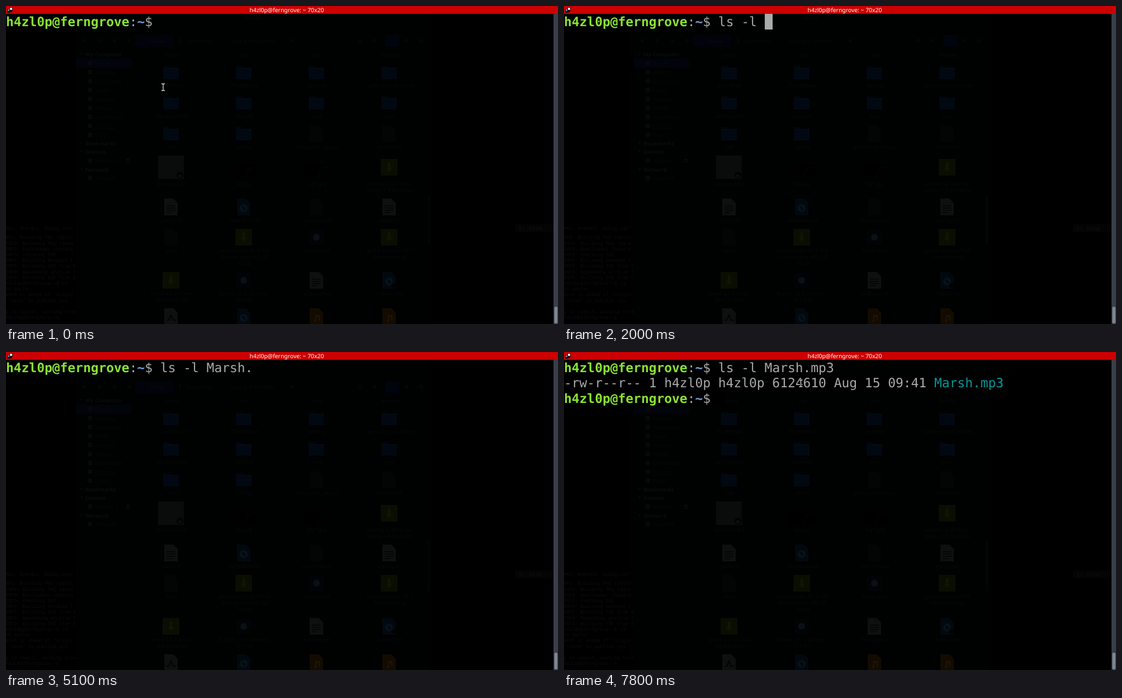
An HTML page for the animation above (8 s loop, 987x568 px).

```html
<!DOCTYPE html>
<html lang="en">
<head>
<meta charset="utf-8">
<title>Terminal</title>
<style>
  html, body { margin: 0; width: 100%; height: 100%; overflow: hidden; background: #000; }
  svg { display: block; width: 987px; height: 568px; }
  text { white-space: pre; text-rendering: geometricPrecision; }
  .term { font: 22.92px "DejaVu Sans Mono", monospace; fill: #aaa; }
  .user { font-weight: bold; fill: #8ae234; }
  .path { font-weight: bold; fill: #729fcf; }
  .file { fill: #06989a; }
  .title { font: 10.4px "Noto Sans", sans-serif; fill: #fff; text-anchor: middle; }
  .label { font: 9.4px "Noto Sans", sans-serif; fill: #101315; text-anchor: middle; }
  .side { font: 9.6px "Noto Sans", sans-serif; fill: #0d1114; }
  .head { font-weight: 600; fill: #14191a; }
  .log { font: 8.4px "DejaVu Sans Mono", monospace; fill: #1a1a1a; }
</style>
</head>
<body>
<svg id="stage" viewBox="0 0 987 568"></svg>
<script>
const stage = document.getElementById('stage');
const USER = 'h4zl0p', HOST = 'ferngrove', COMMAND = 'ls -l Marsh.mp3';
const CELL = 13.8, LINE = 27.6, BASELINE = 35.8, PROMPT_COLS = 20, LOOP = 8000;
let layer = stage;

function add(tag, attrs, content, parent = layer) {
  const node = document.createElementNS('http://www.w3.org/2000/svg', tag);
  for (const key in attrs) node.setAttribute(key, attrs[key]);
  if (content) node.textContent = content;
  parent.appendChild(node);
  return node;
}
const rect = (x, y, width, height, fill, parent, rx = 0) =>
  add('rect', { x, y, width, height, fill, rx }, '', parent);
const path = (d, fill, parent) => add('path', { d, fill }, '', parent);
const circle = (cx, cy, r, fill, parent) => add('circle', { cx, cy, r, fill }, '', parent);
const text = (x, y, cls, content, parent) => add('text', { x, y, class: cls }, content, parent);
const show = (node, on) => node.setAttribute('visibility', on ? 'visible' : 'hidden');

// Windows showing faintly through the terminal
const icons = {
  folder(x, y) {
    path(`M${x - 14} ${y - 12}h11l3 3h14v21h-28z`, '#030d18');
    rect(x - 14, y - 7, 28, 19, '#031022');
    rect(x - 14, y - 8, 28, 1, '#0a1c2b');
  },
  page(x, y, fill = '#1d1e1e') {
    path(`M${x - 12} ${y - 15}h16l8 8v22h-24z`, fill);
  },
  doc(x, y) {
    icons.page(x, y);
    for (let i = 0; i < 4; i++) rect(x - 8, y - 3 + i * 4, i === 3 ? 10 : 16, 1.5, '#060606');
  },
  blank(x, y) { icons.page(x, y, '#070808'); },
  archive(x, y) {
    rect(x - 15, y - 15, 30, 30, '#141b02', undefined, 1);
    path(`M${x - 2} ${y - 9}h4v10h4l-6 7l-6 -7h4z`, '#222a08');
  },
  web(x, y) {
    icons.page(x, y, '#03121f');
    circle(x, y + 2, 7, '#112533');
    path(`M${x - 4} ${y - 2}l6 2l2 6l-5 -1z`, '#03121f');
  },
  disc(x, y) {
    rect(x - 13, y - 13, 26, 26, '#02080f');
    circle(x, y, 6, '#172029');
  },
  picture(x, y) {
    rect(x - 24, y - 6, 48, 29, '#000');
    add('path', { d: `M${x + 3} ${y + 20}q4 -24 19 -20`, fill: 'none', stroke: '#060707', 'stroke-width': 2 });
  },
  locked(x, y) {
    rect(x - 23, y - 21, 46, 42, '#151617');
    circle(x + 16, y + 14, 6, '#040404');
    rect(x + 13, y + 13, 6, 5, '#18191a');
  },
  pulse(x, y) {
    icons.page(x, y);
    add('path', { d: `M${x - 8} ${y + 6}h4l4 -9l4 9h5`, fill: 'none', stroke: '#060606', 'stroke-width': 2 });
  },
  song(x, y) {
    icons.page(x, y, '#291700');
    path(`M${x - 2} ${y - 3}h8v10h-2v-7h-4v9h-4v-3h2z`, '#3a2a10');
  }
};

function drawFileWindow() {
  rect(125, 14, 632, 554, '#010202');
  text(441, 25, 'label', 'Home');
  rect(231, 52, 68, 21, '#010714');
  rect(678, 52, 25, 21, '#010918');
  text(270, 66, 'label', 'Home');
  text(346, 66, 'label', 'Downloads');
  text(440, 66, 'label', 'Tools and Samples');
  rect(310, 57, 3, 10, '#0b0d0f');
  for (const x of [140, 167, 194, 220, 512, 633, 659, 716, 742]) rect(x - 3, 59, 6, 6, '#080a0b');
  rect(754, 338, 4, 90, '#080a0b', undefined, 2);

  rect(125, 94, 100, 16, '#020817');
  const heads = { 90: 'My Computer', 249: 'Bookmarks', 264: 'Devices', 296: 'Network' };
  for (const y in heads) {
    text(142, y, 'side head', heads[y]);
    path(`M132 ${y - 6}h6l-3 4z`, '#0d1112');
  }
  const places = ['Home', 'Desktop', 'Document', 'Music', 'Pictures', 'Videos', 'Downloads', 'File syst', 'Trash'];
  const place = (name, y) => {
    text(159, y + 3.5, 'side', name);
    rect(146, y - 4, 8, 8, '#0d1112', undefined, 1);
  };
  places.forEach((name, i) => place(name, 102 + i * 16));
  rect(159, 219, 38, 1, '#0a1215');
  place('Volume 1', 276);
  place('Network', 307);
  path('M214 276l4 -4l4 4zM214 278h8v1.5h-8z', '#15191b');

  const rows = [
    [119, 'folder folder folder folder', 'thumbnail|Thumbtack|tooling|cyphers-mixd_name', 26],
    [173, 'folder folder folder folder', 'sandbox-old|volume|wire|yarn', 27],
    [228, 'folder folder blank blank', 'ZAP|zinnia|add_cover_peg.cc|analyse.sh', 27],
    [288, 'locked picture picture archive', 'lecture.mp3|bg.jpg|bg1.jpg|builder-2.06-linux-\nglassy-1.9-84.tar.bz', 33],
    [359, 'doc web blank doc', 'cache.in|cabinet.html|centre.wave|config.txt', 27],
    [413, 'blank archive disc archive', 'echo|easybundle-2018.6.4\n-4-linux-gnu-x86_64\n.tar.gz|folder.flask|globe-harvest-14.0\n-linuxsetup.gz', 27],
    [490, 'archive disc doc web', 'good-4.8.6-linux-\nstatic2.tar.gz|Ripple_v3.0_Sample_\nv11.iso|in-progress|index.html', 27],
    [555, 'pulse web song song', '', 0]
  ];
  ['assets', 'site', 'test', 'themes'].forEach((name, i) => text(297 + i * 130, 91, 'label', name));
  for (const [y, kinds, names, drop] of rows) {
    const labels = names.split('|');
    kinds.split(' ').forEach((kind, i) => {
      const x = 295 + i * 130;
      icons[kind](x, y);
      (labels[i] || '').split('\n').forEach((line, n) => text(x + 1, y + drop + n * 11, 'label', line));
    });
  }
  circle(693, 499, 4, '#040404');
}

function drawLogWindow() {
  const log = ['PKG: 0+0+0+1  Debug.conf', '', 'NFO: Building PKG (data1',
    'INFO: Building PKG (data', 'INFO: Bootloader /home/u', 'INFO: checking EXE', 'INFO: Building because t',
    'INFO: Building EXE from E', 'INFO: Appending archive t', 'INFO: Building EXE from E',
    `${USER}@${HOST}:~$ cd`, 'ch master', 'anch is ahead of "origin', ' "send" to publish you',
    '', 'g to commit, working tree', `${USER}@${HOST}:~$ `];
  const clip = add('svg', { width: 125, height: 568 });
  log.forEach((line, i) => text(-1, i ? 396 + i * 10.2 : 400, 'log', line, clip));
  rect(910, 390, 69, 14, '#080808');
  const tab = text(916, 401, 'log', '1: term');
  tab.setAttribute('style', 'font-size:10px;fill:#202020');
}

layer = add('g', { opacity: 0.5 });
drawFileWindow();
drawLogWindow();
layer = stage;

// Terminal contents
function line(row, spans) {
  const node = text(0, BASELINE + row * LINE, 'term');
  for (const [cls, content] of spans) add('tspan', { class: cls }, content, node);
  return node;
}
const prompt = [['user', `${USER}@${HOST}`], ['', ':'], ['path', '~'], ['', '$ ']];
const typed = line(0, [...prompt, ['', '']]).lastChild;

const output = add('g', {});
rect(0, 42, 786.6, 28, '#000', output);
rect(0, 70, 290, 28, '#000', output);
output.append(
  line(1, [['', `-rw-r--r-- 1 ${USER} ${USER} 6124610 Aug 15 09:41 `], ['file', 'Marsh.mp3']]),
  line(2, prompt));
const block = rect(0, 14, 14, 28, '#aaa');

// Title bar and scrollbar
rect(0, 0, 987, 14, '#c00');
rect(2, 5, 6, 7, '#101010');
rect(3, 6, 3, 3, '#5a80a8');
rect(6, 2, 6, 6, '#101010');
rect(7, 3, 4, 4, '#e8e8e8');
rect(8, 8, 3, 3, '#101010');
const title = text(502, 10.8, 'title', `${USER}@${HOST}: ~ 70x20`);
const bell = add('g', {});
circle(980.5, 5.2, 4, '#dfe3e6', bell);
circle(980, 4.6, 2, '#9ba6ae', bell);
rect(979, 8.5, 3.4, 3.6, '#b9bec2', bell, 1);
rect(979, 14, 8, 554, '#393f49');
rect(980.5, 537, 5.5, 30, '#7d8793', stage, 2.7);

const pointer = add('g', {});
const beam = 'M-3 -6h2l1 1l1 -1h2M0 -5v10M-3 6h2l1 -1l1 1h2';
for (const [stroke, width] of [['#000', 3.2], ['#ddd', 1.3]])
  add('path', { d: beam, fill: 'none', stroke, 'stroke-width': width }, '', pointer);

// [time, typed characters, block shown]
const keys = [
  [0, 0, 0], [200, 0, 1], [600, 1, 1], [700, 2, 1], [1000, 3, 1], [1400, 4, 1], [1700, 5, 1],
  [2000, 6, 1], [2400, 7, 1], [3200, 9, 1], [3300, 10, 1], [3500, 11, 1], [4100, 11, 0],
  [4500, 12, 1], [5100, 12, 0], [5300, 13, 1], [5500, 14, 1], [5900, 15, 1],
  [6600, 15, 0], [7200, 15, 1], [7800, 15, 0]
];
// [time, x, y]; no position means hidden
const moves = [
  [0, 281, 145], [600], [6900, 262, 146], [7000, 218, 146], [7100, 199, 144.5], [7200, 206, 136],
  [7300, 238, 120], [7400, 288, 98], [7500, 345, 78], [7600, 395, 63], [7700, 423.5, 56]
];
const at = (table, t) => table.findLast(step => step[0] <= t);

function render(t) {
  const [, count, blockOn] = at(keys, t);
  const done = t >= 6000;
  typed.textContent = COMMAND.slice(0, count);
  show(output, done);
  show(block, blockOn);
  block.setAttribute('x', Math.round((PROMPT_COLS + (done ? 0 : count)) * CELL));
  block.setAttribute('y', done ? 70 : 14);

  const ringing = t >= 3700 && t < 4600;
  show(bell, ringing);
  title.setAttribute('x', ringing ? 495 : 502);

  const [, x, y] = at(moves, t);
  show(pointer, x !== undefined);
  if (x !== undefined) pointer.setAttribute('transform', `translate(${x} ${y})`);
}

const start = performance.now();
function tick() {
  render((performance.now() - start) % LOOP);
  requestAnimationFrame(tick);
}
tick();
</script>
</body>
</html>
```
